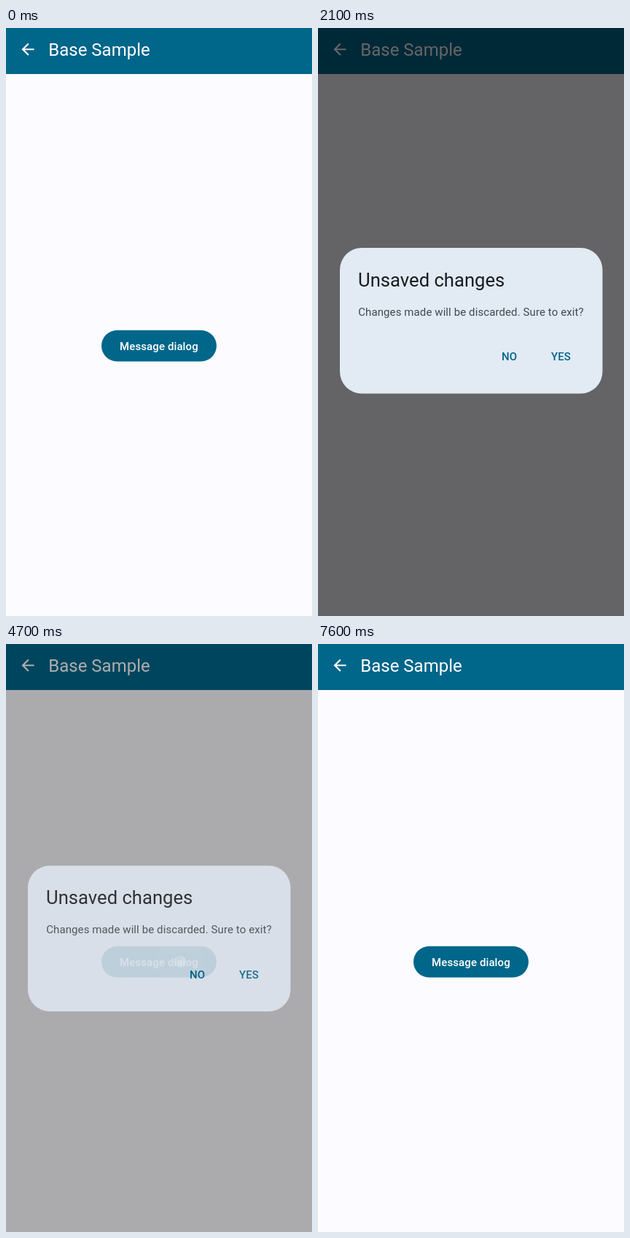
Write an HTML page with a canvas that moves like this. It is 420 px wide and 805 px high and loops after 7.7 s.

```html
<!DOCTYPE html>
<html lang="en">
<head>
<meta charset="utf-8">
<title>Message dialog</title>
<style>
html, body { margin: 0; width: 100%; height: 100%; overflow: hidden; background: #fcfbff; }
canvas { display: block; }
</style>
</head>
<body>
<canvas id="stage" width="420" height="805"></canvas>
<script>
const W = 420, H = 805, LOOP = 7700, STEP = 100;
const ENTER = 300, EXIT = 250;
const PRIMARY = '#00668a';
const ctx = document.getElementById('stage').getContext('2d');

const visits = [
  { open: 1250, close: 3772 },
  { open: 4540, close: 6625 }
];
const taps = [
  { x: 194, y: 436, down: 1100, up: 1220, fade: 150, ripple: true },
  { x: 328, y: 452, down: 3600, up: 3800, fade: 100 },
  { x: 239, y: 435, down: 4400, up: 4600, fade: 150, ripple: true },
  { x: 272, y: 452, down: 6500, up: 6700, fade: 100 }
];
const arrow = new Path2D('M20 11H7.83l5.59-5.59L12 4l-8 8 8 8 1.41-1.41L7.83 13H20v-2z');

const clamp = v => Math.max(0, Math.min(1, v));

function text(c, str, x, y, size, color, weight = 400, spacing = 0) {
  c.font = `${weight} ${size}px Roboto, sans-serif`;
  c.letterSpacing = spacing + 'px';
  c.fillStyle = color;
  c.fillText(str, x, y);
}

function pill(c, x, y, w, h, r, color) {
  c.beginPath();
  c.roundRect(x, y, w, h, r);
  c.fillStyle = color;
  c.fill();
}

// The dialog is composed apart so that it fades as one layer.
const layer = document.createElement('canvas');
layer.width = W;
layer.height = H;
const dialog = layer.getContext('2d');

function composeDialog(dy) {
  dialog.clearRect(0, 0, W, H);
  dialog.save();
  dialog.translate(0, dy);
  pill(dialog, 30, 301, 360.5, 199.5, 30, '#e2eaf4');
  text(dialog, 'Unsaved changes', 55, 354, 25.65, '#191c1e');
  text(dialog, 'Changes made will be discarded. Sure to exit?', 55.2, 394, 15, '#41484d', 400, 0.1);
  text(dialog, 'NO', 252, 455.4, 15, PRIMARY, 500, 0.1);
  text(dialog, 'YES', 320, 455.4, 15, PRIMARY, 500, 0.1);
  dialog.restore();
}

function dialogState(t) {
  for (const { open, close } of visits) {
    if (t < open || t >= close + EXIT) continue;
    if (t < close) {
      const p = clamp((t - open) / ENTER), q = 1 - p;
      return { scrim: 0.6 * p, alpha: 1 - q ** 2.4, dy: 24 * q ** 3 };
    }
    const p = (t - close) / EXIT;
    return { scrim: 0.6 * (1 - p), alpha: 1 - p ** 1.3, dy: -8 * p };
  }
  return null;
}

function tapStrength(tap, t) {
  return t < tap.down ? 0 : clamp(1 - (t - tap.up) / tap.fade);
}

function drawPage(t) {
  ctx.fillStyle = '#fcfbff';
  ctx.fillRect(0, 0, W, H);
  ctx.fillStyle = PRIMARY;
  ctx.fillRect(0, 0, W, 63);
  ctx.save();
  ctx.translate(17.2, 16.4);
  ctx.scale(1.07, 1.07);
  ctx.fillStyle = '#fff';
  ctx.fill(arrow);
  ctx.restore();
  text(ctx, 'Base Sample', 58.3, 38, 24, '#fff');

  pill(ctx, 131, 413.8, 158, 42.6, 21.3, PRIMARY);
  for (const tap of taps.filter(tap => tap.ripple)) drawRipple(tap, tapStrength(tap, t));
  text(ctx, 'Message dialog', 156, 440.8, 15, '#fff', 500, 0.1);
}

function drawRipple({ x, y }, strength) {
  if (!strength) return;
  const glow = ctx.createRadialGradient(x, y, 0, x, y, 46);
  glow.addColorStop(0, `rgba(255,255,255,${0.25 * strength})`);
  glow.addColorStop(1, 'rgba(255,255,255,0)');
  pill(ctx, 131, 413.8, 158, 42.6, 21.3, glow);
}

function drawTap(tap, strength) {
  if (!strength) return;
  ctx.globalAlpha = strength;
  ctx.beginPath();
  ctx.arc(tap.x, tap.y, 9, 0, 2 * Math.PI);
  ctx.fillStyle = 'rgba(240,246,250,0.6)';
  ctx.fill();
  ctx.strokeStyle = 'rgba(130,155,170,0.4)';
  ctx.lineWidth = 1;
  ctx.stroke();
  ctx.globalAlpha = 1;
}

function render(now) {
  const t = Math.floor(now % LOOP / STEP) * STEP;
  drawPage(t);
  const state = dialogState(t);
  if (state) {
    ctx.fillStyle = `rgba(0,0,0,${state.scrim})`;
    ctx.fillRect(0, 0, W, H);
    composeDialog(state.dy);
    ctx.globalAlpha = state.alpha;
    ctx.drawImage(layer, 0, 0);
    ctx.globalAlpha = 1;
  }
  for (const tap of taps) drawTap(tap, tapStrength(tap, t));
}

const start = performance.now();
function tick() {
  render(performance.now() - start);
  requestAnimationFrame(tick);
}
tick();
</script>
</body>
</html>
```
